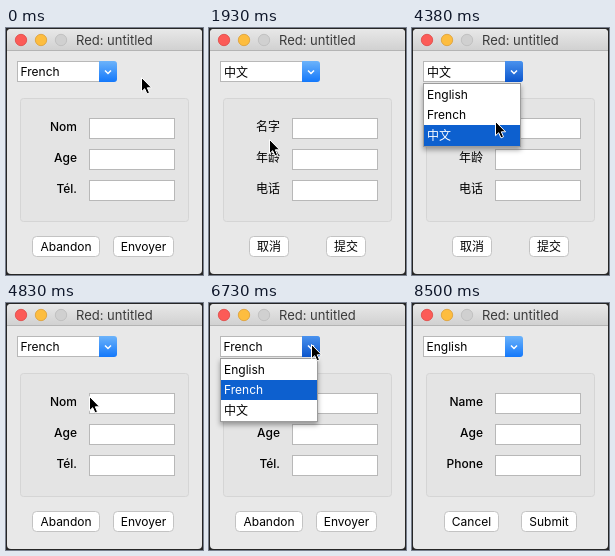
Animation, 197 px wide and 247 px high, one loop 9.12 s. Source, as an HTML page:

```html
<!DOCTYPE html>
<html lang="en">
<head>
<meta charset="utf-8">
<title>Red: untitled</title>
<style>
  html, body { margin: 0; width: 100%; height: 100%; overflow: hidden; background: #262626; }
  body { position: relative; }
  svg { position: absolute; display: block; }
  #window { left: 0; top: 0; }
  text { font: 12px Inter, "Noto Sans CJK SC", "Noto Sans CJK", sans-serif; fill: #000; }
  .title { font-size: 13px; fill: #3a3a3a; }
  .label text { font-weight: 500; text-anchor: end; }
  .button text { text-anchor: middle; }
  .button rect { fill: #fff; stroke: #c3c3c3; }
  .field { fill: #fff; stroke: #b8b8b8; }
  .lit rect { fill: #0d60cf; }
  .lit text { fill: #fff; }

  .fr, .zh, .en, .menu, .lit, #cursor { animation: 9120ms step-end infinite; }
  .fr { animation-name: french; }
  .zh { animation-name: chinese; }
  .en { animation-name: english; }
  .menu { animation-name: menu; }
  .lit.e { animation-name: lit-english; }
  .lit.f { animation-name: lit-french; }
  .lit.z { animation-name: lit-chinese; }

  @keyframes french  { 0%, 52.96% { opacity: 1 } 21.16%, 78.5%, 100% { opacity: 0 } }
  @keyframes chinese { 0%, 52.96%, 100% { opacity: 0 } 21.16% { opacity: 1 } }
  @keyframes english { 0% { opacity: 0 } 78.5%, 100% { opacity: 1 } }
  @keyframes menu {
    0%, 21.16%, 52.96%, 78.5%, 100% { opacity: 0 }
    13.92%, 42.87%, 73.79% { opacity: 1 }
  }
  @keyframes lit-french {
    0%, 50.98%, 100% { opacity: 1 }
    20.5%, 77.52% { opacity: 0 }
  }
  @keyframes lit-chinese {
    0%, 50%, 100% { opacity: 0 }
    20.5% { opacity: 1 }
  }
  @keyframes lit-english {
    0%, 100% { opacity: 0 }
    77.52% { opacity: 1 }
  }

  #cursor { margin: -1px 0 0 -1px; animation-name: pointer; }
  @keyframes pointer {
    0%     { left: 135px; top: 49px }
    3.39%  { left: 133px; top: 50px }
    6.35%  { left: 133px; top: 50px; animation-timing-function: steps(8, start) }
    13.88% { left: 104px; top: 41px }
    14.91% { left: 104px; top: 41px; animation-timing-function: steps(2, start) }
    16.88% { left: 80px;  top: 74px; animation-timing-function: steps(3, start) }
    19.35% { left: 60px;  top: 111px }
    22.14% { left: 60px;  top: 111px; animation-timing-function: steps(3, start) }
    25.1%  { left: 148px; top: 46px }
    33.33% { left: 148px; top: 46px; animation-timing-function: steps(3, start) }
    36.29% { left: 110px; top: 44px }
    39.8%  { left: 109px; top: 43px }
    45.5%  { left: 109px; top: 43px; animation-timing-function: steps(4, start) }
    48.86% { left: 83px;  top: 93px }
    54.6%  { left: 83px;  top: 93px; animation-timing-function: steps(4, start) }
    58.69% { left: 142px; top: 46px }
    67.21% { left: 142px; top: 46px; animation-timing-function: steps(6, start) }
    72.74% { left: 102px; top: 41px }
    74.78% { left: 102px; top: 41px; animation-timing-function: steps(2, start) }
    76.31% { left: 90px;  top: 66px }
    79.49% { left: 90px;  top: 66px; animation-timing-function: steps(3, start) }
    82.29% { left: 153px; top: 44px }
    92.32% { left: 186px; top: 97px }
    93.2%, 100% { left: 186px; top: 270px }
  }
</style>
</head>
<body>
<svg id="window" width="197" height="247" viewBox="0 0 197 247">
  <defs>
    <linearGradient id="bar" x2="0" y2="1">
      <stop stop-color="#e8e8e8"/><stop offset="1" stop-color="#d1d1d1"/>
    </linearGradient>
    <linearGradient id="blue" x2="0" y2="1">
      <stop stop-color="#6cb3fa"/><stop offset="1" stop-color="#1378fb"/>
    </linearGradient>
    <linearGradient id="pressed" x2="0" y2="1">
      <stop stop-color="#4a92ee"/><stop offset="1" stop-color="#0b55cc"/>
    </linearGradient>
    <filter id="shadow" x="-10%" y="-10%" width="120%" height="140%">
      <feDropShadow dx="0" dy="3" stdDeviation="2.5" flood-opacity=".35"/>
    </filter>
    <path id="knob" d="M93 33h15a3 3 0 0 1 3 3v15a3 3 0 0 1-3 3H93z"/>
    <path id="chevron" d="M99 42.5l3 3 3-3" fill="none" stroke="#fff" stroke-width="1.5"/>
  </defs>

  <rect x="1" y="1" width="195" height="245" rx="4" fill="#e8e8e8"/>
  <path d="M1 22V5a4 4 0 0 1 4-4h187a4 4 0 0 1 4 4v17z" fill="url(#bar)"/>
  <path d="M1 22.5h195" stroke="#b4b4b4"/>
  <circle cx="15" cy="12" r="5.7" fill="#fc5b57" stroke="#df4744" stroke-width=".8"/>
  <circle cx="35" cy="12" r="5.7" fill="#fdbd3f" stroke="#de9f34" stroke-width=".8"/>
  <circle cx="55" cy="12" r="5.7" fill="#d0d0d0" stroke="#bcbcbc" stroke-width=".8"/>
  <text class="title" x="70" y="17">Red: untitled</text>

  <rect x="14.5" y="70.5" width="168" height="123" rx="3" fill="#e4e4e4" stroke="#d5d5d5"/>
  <rect class="field" x="83.5" y="90.5" width="85" height="20"/>
  <rect class="field" x="83.5" y="121.5" width="85" height="20"/>
  <rect class="field" x="83.5" y="152.5" width="85" height="20"/>

  <rect x="11.5" y="33.5" width="84" height="20" fill="#fff" stroke="#b8b8b8"/>
  <use href="#knob" fill="url(#blue)"/>
  <use href="#chevron"/>

  <g class="fr">
    <text x="14.5" y="48">French</text>
    <g class="label"><text x="71" y="103">Nom</text><text x="71" y="134">Age</text><text x="71" y="165">Tél.</text></g>
    <g class="button">
      <rect x="26.5" y="208.5" width="67" height="20" rx="4"/><text x="60" y="223">Abandon</text>
      <rect x="107.5" y="208.5" width="60" height="20" rx="4"/><text x="137.5" y="223">Envoyer</text>
    </g>
  </g>
  <g class="zh" lang="zh-CN">
    <text x="15" y="49">中文</text>
    <g class="label"><text x="71" y="103">名字</text><text x="71" y="134">年龄</text><text x="71" y="165">电话</text></g>
    <g class="button">
      <rect x="40.5" y="208.5" width="39" height="20" rx="4"/><text x="60" y="223">取消</text>
      <rect x="117.5" y="208.5" width="39" height="20" rx="4"/><text x="137" y="223">提交</text>
    </g>
  </g>
  <g class="en">
    <text x="14.5" y="48">English</text>
    <g class="label"><text x="71" y="103">Name</text><text x="71" y="134">Age</text><text x="71" y="165">Phone</text></g>
    <g class="button">
      <rect x="32.5" y="208.5" width="54" height="20" rx="4"/><text x="59.5" y="223">Cancel</text>
      <rect x="109.5" y="208.5" width="55" height="20" rx="4"/><text x="137" y="223">Submit</text>
    </g>
  </g>

  <g class="menu">
    <use href="#knob" fill="url(#pressed)"/>
    <use href="#chevron"/>
    <rect x="11.5" y="55.5" width="97" height="63" fill="#fff" stroke="#9c9c9c" filter="url(#shadow)"/>
    <text x="15" y="71">English</text>
    <text x="15" y="91">French</text>
    <text x="15" y="112" lang="zh-CN">中文</text>
    <g class="lit e"><rect x="12" y="56" width="96" height="21"/><text x="15" y="71">English</text></g>
    <g class="lit f"><rect x="12" y="77" width="96" height="20"/><text x="15" y="91">French</text></g>
    <g class="lit z" lang="zh-CN"><rect x="12" y="97" width="96" height="21"/><text x="15" y="112">中文</text></g>
  </g>
</svg>

<svg id="cursor" width="14" height="20" viewBox="-1 -1 14 20">
  <path d="M.5.5v14.2l3.2-3 2.3 5.2 2.5-1.1-2.2-5h4.3z" fill="#000" stroke="#fff" stroke-width="1"/>
</svg>
</body>
</html>
```
